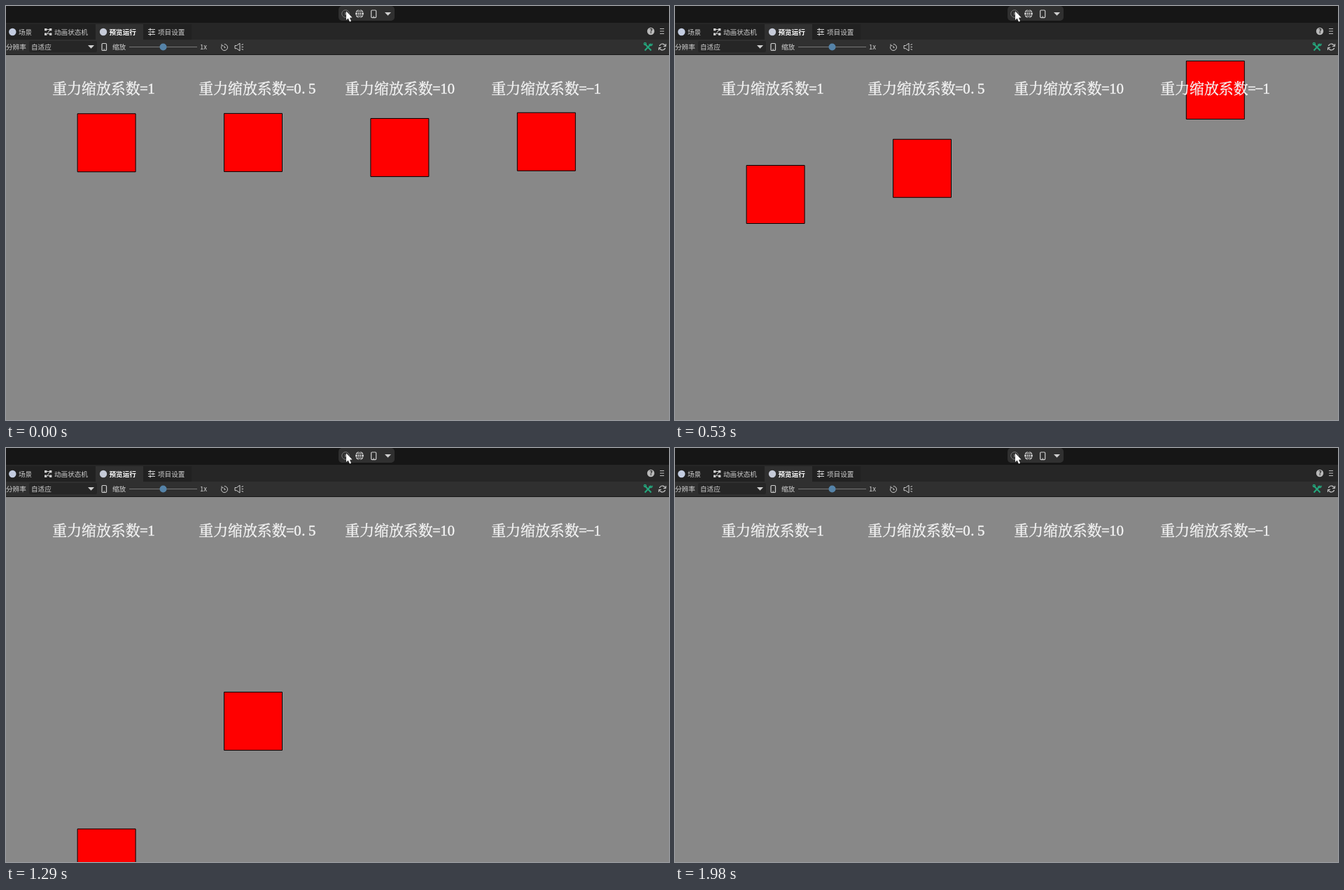
An HTML page with a canvas for the animation above (2.16 s loop, 947x591 px).

```html
<!DOCTYPE html>
<html lang="zh-CN">
<head>
<meta charset="utf-8">
<style>
html, body { margin: 0; width: 100%; height: 100%; overflow: hidden; background: #888; }
canvas { display: block; width: 947px; height: 591px; }
</style>
</head>
<body>
<canvas id="stage" width="947" height="591"></canvas>
<script>
const W = 947, H = 591, TOP = 70, LOOP = 2160;
const STEP = 76, LEAD = 8, LAST = 26;
const BASE = 152.5, SIZE = 83, EM = 20.9;
const LEFT = 101.6, GAP = 209.4;
const SCALES = [1, 0.5, 10, -1];
// [step, root of the distance fallen at gravity scale 1]
const KEYS = [[0, .87], [4, 5.2], [13, 15.49], [17, 19.77], [LAST, 29.96]];

const UI = '"Noto Sans CJK SC", "Noto Sans CJK", "Noto Sans", sans-serif';
const SERIF = '"Noto Serif CJK SC", "Noto Serif CJK", "Noto Sans CJK SC", "Noto Sans CJK", "Liberation Serif", serif';
const DIGITS = '"Liberation Serif", "Noto Serif", serif';
const LIGHT = '#cfcfcf', WHITE = '#f4f4f4';

const ctx = document.getElementById('stage').getContext('2d');
let g = ctx;

function rect(x, y, w, h, fill) {
  g.fillStyle = fill;
  g.fillRect(x, y, w, h);
}

function round(x, y, w, h, r, fill) {
  g.fillStyle = fill;
  g.beginPath();
  g.roundRect(x, y, w, h, r);
  g.fill();
}

function disc(x, y, r, fill) {
  g.fillStyle = fill;
  g.beginPath();
  g.arc(x, y, r, 0, Math.PI * 2);
  g.fill();
}

function arc(x, y, r, a, b, color, width = 1) {
  g.strokeStyle = color;
  g.lineWidth = width;
  g.beginPath();
  g.arc(x, y, r, a, b);
  g.stroke();
}

function path(points, color, { fill = false, width = 1 } = {}) {
  g.beginPath();
  for (let i = 0; i < points.length; i += 2) g.lineTo(points[i], points[i + 1]);
  if (fill) {
    g.closePath();
    g.fillStyle = color;
    g.fill();
  } else {
    g.strokeStyle = color;
    g.lineWidth = width;
    g.stroke();
  }
}

function text(str, x, y, color = LIGHT, weight = 400, size = 9.6) {
  g.font = `${weight} ${size}px ${UI}`;
  g.fillStyle = color;
  g.textAlign = 'left';
  g.fillText(str, x, y);
}

function phone(x, y, w, h) {
  g.strokeStyle = LIGHT;
  g.lineWidth = 1.2;
  g.beginPath();
  g.roundRect(x, y, w, h, 1.3);
  g.stroke();
  rect(x + w / 2 - 1, y + h - 2, 2, 1, LIGHT);
}

function caret(x, y) {
  path([x - 4.5, y - 2, x + 4.5, y - 2, x, y + 2.7], LIGHT, { fill: true });
}

function globe(x, y, r) {
  disc(x, y, r, LIGHT);
  g.strokeStyle = '#303030';
  g.lineWidth = 1;
  g.beginPath();
  g.ellipse(x, y, r * .45, r, 0, 0, 7);
  g.stroke();
  for (const dy of [-2, 2]) path([x - r, y + dy, x + r, y + dy], '#303030');
  path([x, y - r, x, y + r], '#303030');
}

function topBar() {
  rect(0, 0, W, 24, '#161616');
  round(475, 0, 80, 21, 5, '#303030');
  arc(485, 11, 5.3, 0, 7, '#777');
  path([484, 8.5, 484, 13.5, 488, 11], '#777', { fill: true });
  globe(505, 11, 6);
  phone(521.7, 6, 7, 10.6);
  caret(545.5, 11);
  path([486, 7.5, 486, 20, 488.7, 17.5, 491, 22.5, 493, 21.5, 490.9, 16.8, 494.5, 16.6],
    '#fff', { fill: true });
}

function tabs() {
  rect(0, 24, W, 24, '#262626');
  rect(0, 26, 265, 22, '#212121');
  rect(128, 26, 68, 22, '#303030');

  disc(9.3, 37, 5.2, '#c3cce0');
  text('场景', 18, 40.5);

  path([57, 33.5, 63, 33.5, 59, 39.5, 63, 40], LIGHT);
  for (const x of [55, 62]) for (const y of [32, 38.5]) rect(x, y, 3.4, 3.4, LIGHT);
  text('动画状态机', 69, 40.5);

  disc(139, 37, 5.2, '#c6cbd8');
  text('预览运行', 147.5, 40.5, '#fff', 700);

  for (let i = 0; i < 3; i++) {
    const x = 206 + (i % 2) * 4, y = 33.5 + i * 3.5;
    path([203, y, 213, y], LIGHT);
    path([x, y - 1.7, x, y + 1.7], LIGHT, { width: 1.4 });
  }
  text('项目设置', 217, 40.5);

  disc(921, 36, 5.2, '#b8b8b8');
  text('?', 918.9, 39.3, '#262626', 700, 9);
  for (const dy of [-3.5, 0, 3.5]) path([934, 36 + dy, 940, 36 + dy], '#bdbdbd');
}

function toolbar() {
  rect(0, 48, W, 22, '#303030');
  rect(0, 69, W, 1, '#181818');
  text('分辨率', 0, 62);
  round(33, 50, 97, 16, 2, '#262626');
  text('自适应', 36, 62);
  caret(121.5, 58);
  phone(137, 53.5, 6.5, 10);
  text('缩放', 152, 62);
  rect(176, 58, 97, 1, '#777');
  disc(224.5, 58.5, 5, '#5583a8');
  text('1x', 277, 62);

  arc(312, 59, 4.5, -1.6, 3.5, LIGHT);
  path([308, 54.5, 308.2, 57, 310.6, 56.6], LIGHT);
  path([312, 57, 312, 59.5, 313.5, 59.5], LIGHT);

  path([327, 56.5, 329.5, 56.5, 334, 53.2, 334, 64, 329.5, 60.7, 327, 60.7, 327, 56.5], LIGHT);
  for (const dy of [-3, 0, 3]) path([336.5, 58.5 + dy, 339, 58.5 + dy * 1.3], LIGHT);

  const green = '#25a57c';
  for (const s of [-1, 1]) path([917 - 4.5 * s, 54, 917 + 4.5 * s, 63.5], green, { width: 2.1 });
  arc(921, 54.5, 2, -.4, 3.3, green, 1.5);
  arc(912.8, 54, 1.6, 0, 7, green, 1.2);

  for (const s of [-1, 1]) {
    const a = s < 0 ? 3.5 : .36;
    arc(937.5, 58.5, 4.4, a, a + 2.4, LIGHT, 1.2);
    path([937.5 - 5.1 * s, 58.5 + 4.5 * s, 937.5 - 5.1 * s, 58.5 + .9 * s,
      937.5 - 1.5 * s, 58.5 + .9 * s], LIGHT);
  }
}

// Light outline thickens the thin serif strokes
function bold(str, x, y) {
  g.fillText(str, x, y);
  g.strokeText(str, x, y);
}

function label(scale, n) {
  const x = 66.3 + n * 209, y = 125;
  g.fillStyle = g.strokeStyle = WHITE;
  g.lineWidth = .4;
  g.textAlign = 'left';
  g.font = `${EM}px ${SERIF}`;
  bold('重力缩放系数', x, y);
  g.font = `${EM}px ${DIGITS}`;
  g.textAlign = 'center';
  // Half-width cells; a minus sign keeps the width of the equals sign
  [...`=${scale}`.replace('-', '−')].forEach((ch, i) => {
    bold(ch, x + EM * (6.25 + i / 2) - (ch === '.' ? 2 : 0), y);
  });
}

function fallen(step) {
  const i = Math.max(1, KEYS.findIndex(k => k[0] >= step));
  const [s0, a] = KEYS[i - 1], [s1, b] = KEYS[i];
  return (a + (b - a) * (step - s0) / (s1 - s0)) ** 2;
}

function drawBox(x, y) {
  g.fillStyle = '#f00';
  g.strokeStyle = '#000';
  g.lineWidth = 1;
  g.beginPath();
  g.rect(x + .5, y + .5, SIZE, SIZE);
  g.fill();
  g.stroke();
}

// The bars never change, so they are painted once
const bars = document.createElement('canvas');
bars.width = W;
bars.height = TOP;
g = bars.getContext('2d');
topBar();
tabs();
toolbar();
g = ctx;

function frame() {
  const t = performance.now() % LOOP;
  const d = fallen(Math.min(LAST, Math.floor((t + LEAD) / STEP)));
  rect(0, 0, W, H, '#888');
  SCALES.forEach((k, n) => drawBox(LEFT + n * GAP, BASE + d * k));
  SCALES.forEach(label);
  g.drawImage(bars, 0, 0);
  requestAnimationFrame(frame);
}
frame();
</script>
</body>
</html>
```
